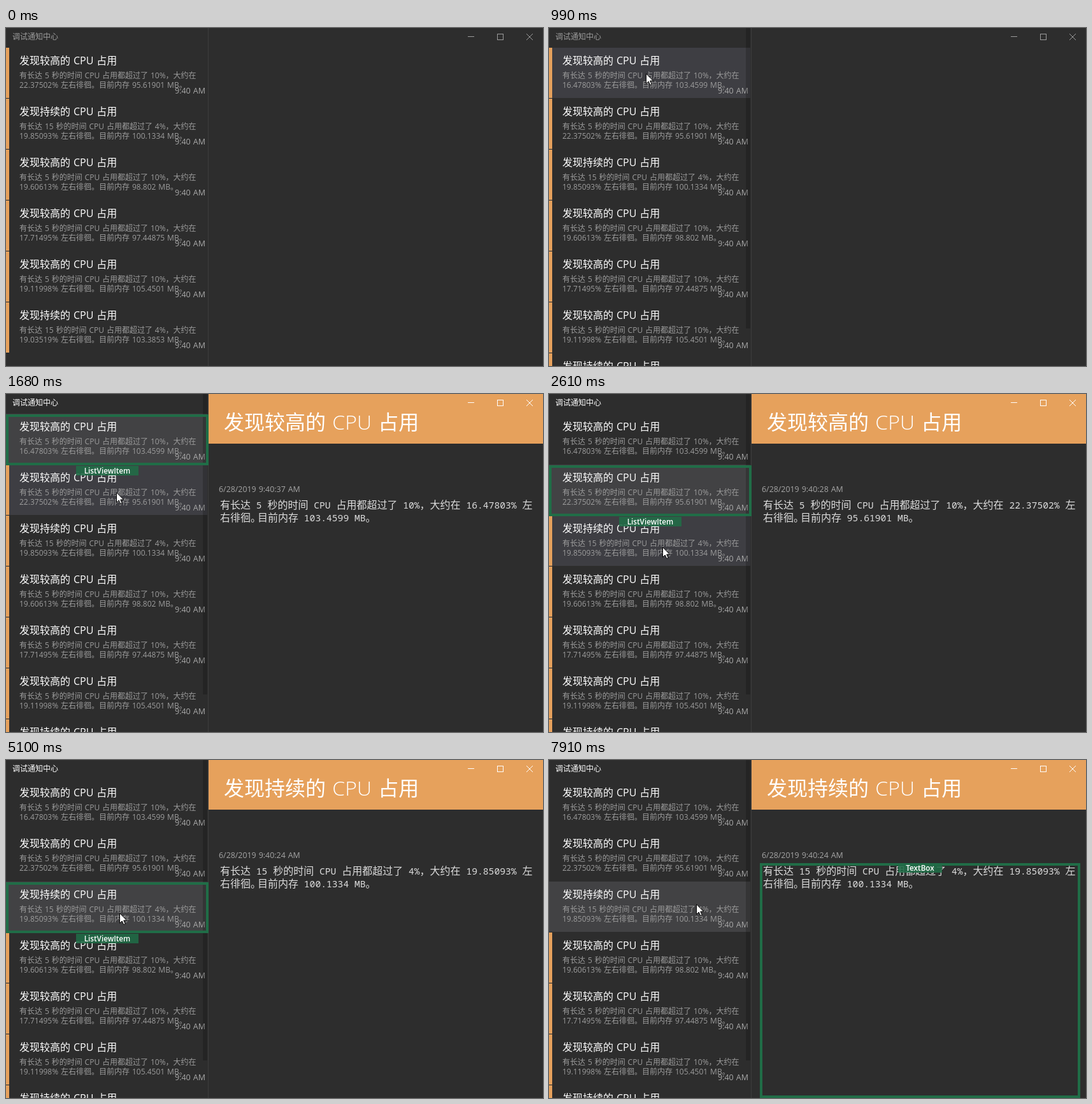
An HTML page with a canvas that plays this animation: 843x531 px, repeating every 8000 ms.

```html
<!DOCTYPE html>
<html lang="zh-CN">
<head>
<meta charset="utf-8">
<title>调试通知中心</title>
<style>
  html, body { margin: 0; width: 100%; height: 100%; overflow: hidden; background: #2d2d2d; }
  canvas { display: block; }
</style>
</head>
<body>
<canvas id="stage" width="843" height="531"></canvas>
<script>
const ctx = document.getElementById('stage').getContext('2d');
const LOOP = 8000, TOP = 31, ROW = 80, PANE = 317;
const SANS = '"Open Sans", "Noto Sans CJK SC", sans-serif';
const MONO = '"Noto Sans Mono", monospace';
const GREEN = '#206d47', ORANGE = '#e6a15c', GREY = '#9c9c9c';

const high = (cpu, memory, time) => ({ title: '较高', secs: 5, limit: 10, cpu, memory, time });
const steady = (cpu, memory, time) => ({ title: '持续', secs: 15, limit: 4, cpu, memory, time });
const items = [
  high('16.47803', '103.4599', '9:40:37'),
  high('22.37502', '95.61901', '9:40:28'),
  steady('19.85093', '100.1334', '9:40:24'),
  high('19.60613', '98.802'),
  high('17.71495', '97.44875'),
  high('19.11998', '105.4501'),
  steady('19.03519', '103.3853')
];

// [time, x, y]
const pointer = [
  [70, 533, 388], [140, 330, 235], [210, 180, 140],
  [450, 176, 128], [530, 163, 95], [610, 152, 71],
  [1460, 154, 82], [1530, 160, 110], [1600, 168, 138], [1680, 173, 154],
  [2460, 174, 172], [2530, 177, 212], [2610, 178, 240],
  [7060, 183, 239], [7130, 191, 236], [7210, 200, 233], [7290, 205, 232],
  [7760, 212, 231], [7830, 223, 228], [7910, 231, 226]
];
const INSERTED = 990;
const selections = [[1080, 0], [2080, 1], [3010, 2]];
const focuses = [[1080, 'item'], [3790, 'box'], [5100, 'item'], [5970, 'box']];
const latest = (list, t) => list.filter(step => step[0] <= t).pop();

function rect(x, y, w, h, color) {
  ctx.fillStyle = color;
  ctx.fillRect(x, y, w, h);
}

function text(str, x, y, size, color, { weight = 400, align = 'left', gap = 0.8 } = {}) {
  ctx.font = `${weight} ${size}px ${SANS}`;
  ctx.wordSpacing = gap + 'px';
  ctx.textAlign = align;
  ctx.fillStyle = color;
  ctx.fillText(str, x, y);
}

// Fixed-pitch Latin mixed with full-width Chinese
function monoText(str, x, y) {
  ctx.textAlign = 'left';
  ctx.wordSpacing = '0px';
  ctx.fillStyle = '#dcdcdc';
  for (const ch of str) {
    const latin = ch < '\x7f';
    ctx.font = latin ? `14.67px ${MONO}` : `16px ${SANS}`;
    ctx.fillText(ch, x, y);
    x += latin ? 8.8 : ch === '。' ? 11 : 16;
  }
}

const heading = item => `发现${item.title}的 CPU 占用`;
const usage = item => `有长达 ${item.secs} 秒的时间 CPU 占用都超过了 ${item.limit}%，大约在`;
const memory = item => `徘徊。目前内存 ${item.memory} MB。`;

function drawRow(item, y, { hover, selected, unread }) {
  if (selected) rect(0, y, 316, 79, '#424244');
  else if (hover) rect(5, y, 311, 79, '#3e3e43');
  if (unread) {
    rect(0, y, 5, 79, ORANGE);
    rect(0, y + 79, 5, 1, '#1d2935');
  }
  text(heading(item), 21, y + 26, 16, '#fff');
  text(usage(item), 21, y + 48, 12, GREY);
  text(`${item.cpu}% 左右${memory(item)}`, 21, y + 63, 12, GREY);
  text('9:40 AM', 313, y + 72, 12.5, '#a8a8a8', { align: 'right' });
}

function drawDetail(item) {
  rect(318, 0, 525, 78, ORANGE);
  text(heading(item), 342, 56, 32, '#fff', { weight: 300, gap: 2 });
  text(`6/28/2019 ${item.time} AM`, 334, 154, 12.4, '#a5a5a5');
  monoText(`${usage(item)} ${item.cpu}% 左`, 336, 180);
  monoText('右' + memory(item), 336, 200);
}

function drawFocus(x, y, w, h, name, labelY, labelWidth) {
  ctx.strokeStyle = GREEN;
  ctx.lineWidth = 4;
  ctx.strokeRect(x + 2, y + 2, w - 4, h - 4);
  const middle = x + w / 2;
  ctx.globalAlpha = 0.88;
  rect(Math.round(middle - labelWidth / 2), labelY, labelWidth, 15, GREEN);
  ctx.globalAlpha = 1;
  text(name, middle, labelY + 12, 11.7, '#fff', { weight: 600, align: 'center' });
}

function drawWindowButtons(color) {
  ctx.strokeStyle = color;
  ctx.lineWidth = 1;
  ctx.strokeRect(771.5, 9.5, 9, 9);
  ctx.stroke(new Path2D('M725 13.5h10M817 9l10 10M827 9l-10 10'));
}

const arrow = new Path2D('M.5 .8V16.4L4.2 13L6.8 18.6L9.2 17.5L6.7 12H11.6Z');
function drawPointer(x, y) {
  ctx.save();
  ctx.translate(x, y);
  ctx.fillStyle = '#fff';
  ctx.strokeStyle = '#000';
  ctx.lineWidth = 1;
  ctx.fill(arrow);
  ctx.stroke(arrow);
  ctx.restore();
}

function draw(t) {
  const [, px, py] = latest(pointer, t) || [0, -99, -99];
  const [, selected] = latest(selections, t) || [0, -1];
  const focus = latest(focuses, t);
  const active = selected >= 0;
  const inserted = t >= INSERTED;
  const hovered = px >= 0 && px < PANE ? Math.floor((py - TOP) / ROW) : -1;
  const visible = inserted ? items : items.slice(1);

  rect(0, 0, 843, 531, '#2d2d2d');
  text('调试通知中心', 10, 18, 12, active ? '#fff' : GREY);
  visible.forEach((item, i) => drawRow(item, TOP + i * ROW, {
    hover: i === hovered, selected: i === selected, unread: i > selected
  }));
  if (inserted) rect(309, 0, 7, 472, 'rgba(0,0,0,.2)');
  rect(PANE, 0, 1, 531, '#3d3d3d');

  if (active) drawDetail(items[selected]);
  drawWindowButtons(active ? '#fff' : GREY);
  if (focus && focus[1] === 'item') {
    const y = TOP + selected * ROW;
    drawFocus(0, y + 1, 318, 80, 'ListViewItem', y + 82, 98);
  } else if (focus) {
    drawFocus(331, 162, 503, 369, 'TextBox', 162, 69);
  }
  drawPointer(px, py);
}

const start = performance.now();
function tick() {
  draw((performance.now() - start) % LOOP);
  requestAnimationFrame(tick);
}
tick();
</script>
</body>
</html>
```
